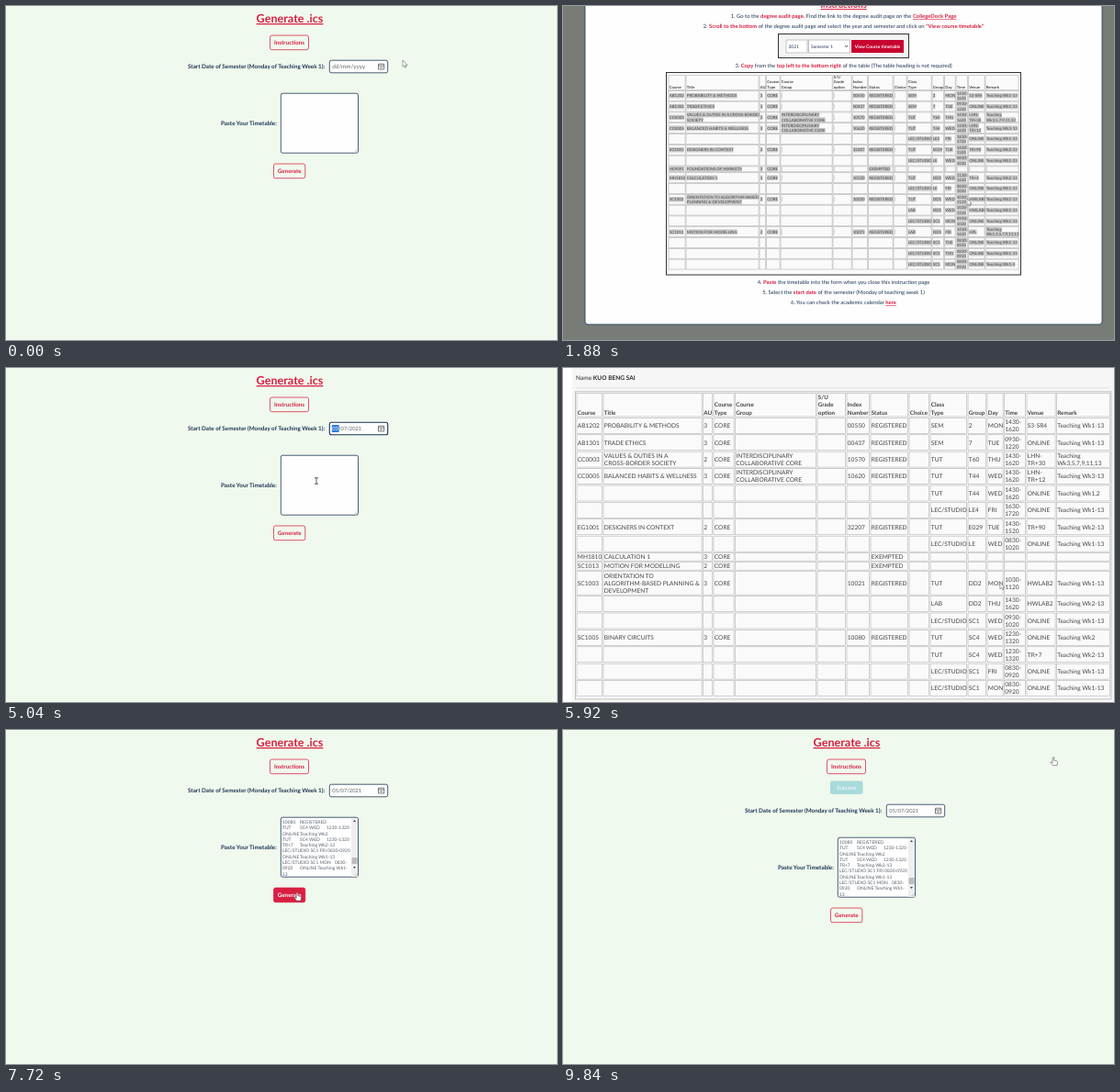
An HTML page for the animation above (9.88 s loop, 600 by 364 pixels).

```html
<!DOCTYPE html>
<html lang="en">
<head>
<meta charset="utf-8">
<title>Timetable to calendar</title>
<style>
html, body { margin: 0; width: 100%; height: 100%; overflow: hidden; background: #f0f9ed; }
svg { display: block; width: 600px; height: 364px; font-family: Lato, "Open Sans", sans-serif; text-rendering: geometricPrecision; fill: #1d3557; }
text { white-space: pre; }
.b { font-weight: 700; }
.m { text-anchor: middle; }
.r { fill: #d81f42; }
.u { text-decoration: underline; }
.btn rect { fill: none; stroke: #d81f42; stroke-width: .75; }
.btn text { fill: #d81f42; }
.btn.hot rect { fill: #d81f42; }
.btn.hot text { fill: #fff; }
.field { fill: #fdfefd; stroke: #1d3557; stroke-width: .8; }
.field.focus { stroke-width: 1.1; }
.cell { fill: #fafafa; stroke: #b2b2b2; stroke-width: .6; }
.hi { fill: #c9c9c9; }
.plain .hi { display: none; }
.table text { fill: #444; }
</style>
</head>
<body>
<svg id="stage" viewBox="0 0 600 364"></svg>
<script>
const LOOP = 9880;
const $ = id => document.getElementById(id);
const pen = document.createElement('canvas').getContext('2d');

const text = (s, x, y, size, cls = '') => `<text x="${x}" y="${y}" font-size="${size}" class="${cls}">${s}</text>`;
const box = (x, y, w, h, attrs = '') => `<rect x="${x}" y="${y}" width="${w}" height="${h}" ${attrs}/>`;
const button = (id, label, x, y, w) =>
  `<g id="${id}" class="btn">${box(x, y, w, 15.7, 'rx="2"')}${text(label, x + w / 2, y + 10.3, 6.25, 'b m')}</g>`;

// --- timetables ---
const HEAD = ['Course', 'Title', 'AU', 'Course~Type', 'Course~Group', 'S/U~Grade~option', 'Index~Number',
  'Status', 'Choice', 'Class~Type', 'Group', 'Day', 'Time', 'Venue', 'Remark'];
const SHARED = 'INTERDISCIPLINARY~COLLABORATIVE CORE';

// code|title|au|index|class|group|day|time|venue|weeks|course group
function cellsOf(row) {
  const [code, title, au, index, kind, group, day, time, venue, weeks, family = ''] = row.split('|');
  const slot = kind
    ? [kind, group, day, time.replace('-', '-~'), venue, 'Teaching' + (weeks.length > 5 ? '~' : ' ') + 'Wk' + weeks]
    : Array(6).fill('');
  return code
    ? [code, title, au, 'CORE', family, '', index, kind ? 'REGISTERED' : 'EXEMPTED', '', ...slot]
    : [...Array(9).fill(null), ...slot];
}

function table(cols, top, rows, o) {
  let y = top;
  const line = (cells, h, head) => {
    const size = head ? o.size * .95 : o.size;
    pen.font = `${head ? 700 : 400} ${size}px Lato, "Open Sans", sans-serif`;
    let out = `<g class="row${head && !o.headSelected ? ' plain' : ''}" data-end="${y + h}">`;
    cells.forEach((cell, i) => {
      const x = cols[i];
      out += box(x, y, cols[i + 1] - x - o.gap, h - o.gap, 'class="cell"');
      if (cell === null) return;
      const parts = cell.split('~'), n = parts.length;
      parts.forEach((s, k) => {
        const mid = head ? y + h - o.lead / 2 - o.gap * 1.4 + (k - n + 1) * o.lead
                         : y + (h - o.gap) / 2 + (k - (n - 1) / 2) * o.lead;
        const w = s ? pen.measureText(s).width : o.gap;
        out += box(x + .8, mid - o.lead / 2, w, o.lead, 'class="hi"');
        if (s) out += text(s, x + .8, mid + size * .35, size, head ? 'b' : '');
      });
    });
    y += h;
    return out + '</g>';
  };
  let out = line(HEAD, o.head, true);
  for (const row of rows) {
    const cells = cellsOf(row);
    const tall = cells[1] && cells[1].split('~').length > 2;
    out += line(cells, cells[7] === 'EXEMPTED' ? o.low : tall ? 27 : o.high);
  }
  return `<g class="table">${out}</g>`;
}

const bigRows = [
  'AB1202|PROBABILITY & METHODS|3|00550|SEM|2|MON|1430-1620|S3-SR4|1-13',
  'AB1301|TRADE ETHICS|3|00437|SEM|7|TUE|0930-1220|ONLINE|1-13',
  'CC0003|VALUES & DUTIES IN A~CROSS-BORDER SOCIETY|2|10570|TUT|T60|THU|1430-1620|LHN-~TR+30|3,5,7,9,11,13|' + SHARED,
  'CC0005|BALANCED HABITS & WELLNESS|3|10620|TUT|T44|WED|1430-1620|LHN-~TR+12|3-13|' + SHARED,
  '||||TUT|T44|WED|1430-1620|ONLINE|1,2',
  '||||LEC/STUDIO|LE4|FRI|1630-1720|ONLINE|1-13',
  'EG1001|DESIGNERS IN CONTEXT|2|32207|TUT|E029|TUE|1430-1520|TR+90|2-13',
  '||||LEC/STUDIO|LE|WED|0830-1020|ONLINE|1-13',
  'MH1810|CALCULATION 1|3|',
  'SC1013|MOTION FOR MODELLING|2|',
  'SC1003|ORIENTATION TO~ALGORITHM-BASED PLANNING &~DEVELOPMENT|3|10021|TUT|DD2|MON|1030-1120|HWLAB2|1-13',
  '||||LAB|DD2|THU|1430-1620|HWLAB2|2-13',
  '||||LEC/STUDIO|SC1|WED|0930-1020|ONLINE|1-13',
  'SC1005|BINARY CIRCUITS|3|10080|TUT|SC4|WED|1230-1320|ONLINE|2',
  '||||TUT|SC4|WED|1230-1320|TR+7|2-13',
  '||||LEC/STUDIO|SC1|FRI|0830-0920|ONLINE|1-13',
  '||||LEC/STUDIO|SC1|MON|0830-0920|ONLINE|1-13'
];
const smallRows = [
  ...bigRows.slice(0, 2),
  'CC0003|VALUES & DUTIES IN A CROSS-BORDER~SOCIETY|2|10570|TUT|T60|THU|1430-1620|LHN-~TR+30|3,5,7,9,11,13|' + SHARED,
  bigRows[3],
  '||||LEC/STUDIO|LE2|FRI|1630-1720|ONLINE|1-13',
  ...bigRows.slice(6, 8),
  'HE9091|FOUNDATIONS OF MARKETS|3|',
  'MH1810|CALCULATION 1|3|10120|TUT|DD1|WED|1130-1220|TR+4|2-13',
  '||||LEC/STUDIO|LE|FRI|0830-1020|ONLINE|1-13',
  'SC1003|ORIENTATION TO ALGORITHM-BASED~PLANNING & DEVELOPMENT|3|10020|TUT|DD1|WED|1030-1120|HWLAB1|1-13',
  '||||LAB|DD1|WED|1030-1220|HWLAB1|1-13',
  '||||LEC/STUDIO|SC1|MON|0930-1020|ONLINE|1-13',
  'SC1013|MOTION FOR MODELLING|2|10073|LAB|DD1|FRI|1430-1620|HPL|1,3,5,7,9,11,13',
  '||||LEC/STUDIO|SC1|TUE|0830-0920|ONLINE|1-13',
  '||||LEC/STUDIO|SC1|THU|0830-0920|ONLINE|1-13',
  '||||LEC/STUDIO|SC1|MON|0830-0920|ONLINE|1-4'
];

// --- scenes ---
const stops = [301, 320, 349, 358];
const pasted = [
  '10080\tREGISTERED', 'TUT\tSC4 WED\t1230-1320', 'ONLINE\tTeaching Wk2', 'TUT\tSC4 WED\t1230-1320',
  'TR+7\tTeaching Wk2-13', 'LEC/STUDIO SC1 FRI 0830-0920', 'ONLINE\tTeaching Wk1-13',
  'LEC/STUDIO SC1 MON\t\t\t0830-', '0920\tONLINE Teaching Wk1-', '13'
].map((s, i) => s.split('\t').map((p, k) => text(p, stops[k], 102 + i * 6.28, 4.95)).join('')).join('');

const page = `<g id="page">
  ${text('Generate .ics', 309, 18, 12.6, 'b m r u')}
  ${button('instr', 'Instructions', 287.5, 32, 42)}
  <g id="ok">${box(291, 55.5, 35.5, 14.5, 'rx="2" fill="#a8dadc"')}
    <g fill="#fff">${text('Success', 308.7, 65, 6.2, 'm')}</g></g>
  <g id="form">
    ${text('Start Date of Semester (Monday of Teaching Week 1):', 198, 68.2, 6.3, 'b')}
    ${box(352.3, 59.2, 63.4, 13.6, 'rx="2" class="field" id="date"')}
    ${box(354.8, 62, 7.8, 8, 'id="mark" fill="#2f7cd6"')}
    <text id="dateText" x="355.3" y="68.2" fill="#666"><tspan id="day"></tspan><tspan id="rest"></tspan></text>
    <path d="M405.5 63.2h6.2v5.8h-6.2zM405.5 65h6.2M407 67h3.2" fill="none" stroke="#444" stroke-width=".7"/>
    ${text('Paste Your Timetable:', 234, 130, 6.35, 'b')}
    ${box(299.3, 95.2, 84.2, 65, 'rx="2" class="field"')}
    <g id="pasted"><g fill="#5b6270">${pasted}</g>
      ${box(376, 96, 7, 63.8, 'fill="#efefef"')}${box(376.5, 139, 6, 7, 'fill="#bdbdbd"')}
      <path d="M378 100l1.5-2 1.5 2zM378 149l1.5 2 1.5-2z" fill="#444"/></g>
    <path d="M379.5 159l3-3M381.3 159l1.2-1.2" stroke="#999" stroke-width=".5"/>
    ${button('gen', 'Generate', 291.5, 172, 34.3)}
  </g></g>`;

const strong = s => `<tspan class="b r">${s}</tspan>`;
const link = s => `<tspan class="b r u">${s}</tspan>`;
const steps = [
  [49, `1. Go to the ${strong('degree audit page.')} Find the link to the degree audit page on the ${link('CollegeDock Page')}`],
  [60.3, `2. ${strong('Scroll to the bottom')} of the degree audit page and select the year and semester and click on ${strong('"View course timetable"')}`],
  [102.5, `3. ${strong('Copy')} from the ${strong('top left to the bottom right')} of the table (The table heading is not required)`],
  [339.3, `4. ${strong('Paste')} the timetable into the form when you close this instruction page`],
  [350.3, `5. Select the ${strong('start date')} of the semester (Monday of teaching week 1)`],
  [361.3, `6. You can check the academic calendar ${link('here')}`]
].map(([y, s]) => text(s, 305.5, y, 5.9, 'm')).join('');

const modal = `<g id="modal">${box(0, 0, 600, 364, 'fill="#000" opacity=".5"')}
  <g id="panel">${box(24, 23, 563, 360, 'rx="3" fill="#fdfefd" stroke="#1d3557" stroke-width=".8"')}
    ${text('Instructions', 305.5, 38, 9.5, 'b m r u')}${steps}
    ${box(234.5, 66.5, 142, 26, 'fill="#f5f5f5" stroke="#333"')}
    ${box(243, 73, 23, 14, 'fill="#fff" stroke="#aaa" stroke-width=".7"')}
    ${box(267.5, 73, 45, 14, 'fill="#fff" stroke="#aaa" stroke-width=".7"')}
    ${box(314, 73, 57, 14, 'fill="#c8022f"')}
    ${text('2021', 245.5, 81.7, 4.9)}${text('Semester 1', 270, 81.7, 4.9)}
    <path d="M307 79l1.5 1.6 1.5-1.6" fill="none" stroke="#222" stroke-width=".8"/>
    <g fill="#fff">${text('View Course timetable', 342.5, 81.7, 4.9, 'b m')}</g>
    ${box(112.5, 108.5, 386, 220.5, 'fill="#fafafa" stroke="#333"')}
    ${table([115, 134, 214, 221.5, 237, 294, 315, 332.5, 360, 375, 402, 415.5, 428, 441.5, 460, 497], 111.7, smallRows,
      { size: 4.4, lead: 5.4, gap: .9, head: 16.6, high: 11.8, low: 6.8 })}
  </g></g>`;

const records = `<g id="records">${box(0, 0, 600, 364, 'fill="#fff"')}<g id="sheet">
  ${box(10, 10, 20, 20, 'fill="#bd2440"')}
  <g fill="#1c2c6b">${['HALVERN', 'POLYTECHNICAL', 'UNIVERSITY'].map((s, i) => text(s, 33, 13 + i * 6.4, 5.7, 'b')).join('')}</g>
  <g letter-spacing=".55">${text('EASTMOORE', 33, 32, 4.9, 'b r')}</g>
  <g fill="#2b2b2b">${text('Scholar Integrated Enrolment Database', 9.5, 71, 13.3, 'b')}
    ${text('Check/Print Courses Registered for 2021-2022 Semester 1', 9.5, 96, 9.9, 'b')}
    ${box(10, 107, 590, 420, 'fill="#f6f6f6"')}${box(14, 135, 582, .8, 'fill="#ddd"')}
    ${text('Name <tspan class="b">KUO BENG SAI</tspan>', 14, 126.8, 6.6)}</g>
  ${box(13.5, 139.5, 583.5, 335, 'fill="#fdfdfd" stroke="#b2b2b2" stroke-width=".8"')}
  ${table([15, 44, 152.5, 164, 187.5, 277, 309, 335, 377, 400, 441, 462, 480.5, 505, 537.5, 597], 141, bigRows,
    { size: 6.6, lead: 8.1, gap: 1.4, head: 27, high: 18.4, low: 10, headSelected: true })}
</g></g>`;

const shapes = {
  a: '<path d="M0 0V7.4L1.7 5.9 2.8 8.3 3.9 7.8 2.9 5.5H5.1Z" fill="#fff" stroke="#666" stroke-width=".6"/>',
  i: '<path d="M-2-3.2H2M0-3.2V3.2M-2 3.2H2" stroke="#333" stroke-width=".8"/>',
  h: '<path d="M-.8 0Q0-.9.8 0V3.1L3.8 3.9Q4.7 4.3 4.5 5.2L3.9 8.6H-.4L-3 5.5Q-2.8 4.5-2 4.9L-.8 5.7Z" fill="#fff" stroke="#555" stroke-width=".6"/>'
};
$('stage').innerHTML = page + modal + records + '<g id="cursor"></g>';

// --- motion: time, x, y, cursor shape ---
const path = [
  [40, 432, 59, 'a'], [200, 385, 165, 'a'], [340, 231, 150, 'a'], [480, 262, 14, 'a'], [640, 311, 40, 'h'],
  [880, 311, 42, 'h'], [920, 311, 46, 'i'], [1120, 420, 200, 'a'], [1800, 440, 210, 'a'], [1880, 440, 210, 'a'],
  [2080, 593, 150, 'a'], [2160, 593, 150, 'a'], [2560, 408, 66, 'h'], [2880, 408, 66, 'h'], [3160, 411, 80, 'a'],
  [3520, 362, 80, 'a'], [3680, 362, 80, 'a'], [3960, 330, 175, 'i'], [4200, 205, 120, 'a'], [4420, 270, 16, 'a'],
  [4640, 245, 70, 'i'], [4800, 372, 122, 'i'], [4960, 372, 122, 'i'], [5040, 338, 123, 'i'], [5160, 338, 123, 'i'],
  [5480, 210, -10, 'a'], [5720, 210, -10, 'a'], [6040, 592, 340, 'i'], [6560, 18, 150, 'i'], [6740, 409, 0, 'i'],
  [6800, 409, 0, 'a'], [7040, 340, 125, 'i'], [7240, 340, 125, 'i'], [7600, 317, 177.5, 'h'], [7920, 317, 177.5, 'h'],
  [8200, 340, 120, 'i'], [8520, 300, 195, 'a'], [8840, 330, 190, 'a'], [8920, 330, 190, 'a'], [9240, 270, 90, 'a'],
  [9480, 380, 2, 'a'], [9760, 534, 30, 'h']
];
const span = (t, a, b) => (1 - Math.cos(Math.PI * Math.min(1, Math.max(0, (t - a) / (b - a))))) / 2;

function cursorAt(t) {
  const n = path.findIndex(k => k[0] > t);
  if (n === 0) return path[0].slice(1);
  if (n < 0) return path[path.length - 1].slice(1);
  const [t0, x0, y0, kind] = path[n - 1], [t1, x1, y1] = path[n], p = span(t, t0, t1);
  return [x0 + (x1 - x0) * p, y0 + (y1 - y0) * p, kind];
}

const show = (id, on) => { $(id).style.display = on ? '' : 'none'; };
const move = (id, x, y) => $(id).setAttribute('transform', `translate(${x} ${y})`);
const rows = [...document.querySelectorAll('#records .row')];

function draw(t) {
  const [x, y, kind] = cursorAt(t);
  const open = t >= 880 && t < 2160, away = t >= 5720 && t < 6800, done = t >= 7920;
  const over = (x0, y0, w) => !open && !away && x >= x0 && x <= x0 + w && y >= y0 && y <= y0 + 15;

  show('modal', open);
  move('page', open ? -4 : 0, 0);
  move('panel', 0, -36 * span(t, 1200, 1760));

  const picked = t >= 3480, marked = t >= 2600 && t < 5160;
  show('mark', marked);
  $('date').classList.toggle('focus', marked);
  $('dateText').setAttribute('font-size', picked ? 5.75 : 6.3);
  $('day').textContent = picked ? '05' : 'dd';
  $('day').setAttribute('fill', marked ? '#fff' : '#666');
  $('rest').textContent = picked ? '/07/2021' : '/mm/yyyy';

  show('pasted', t >= 7200);
  show('ok', done);
  $('ok').setAttribute('opacity', span(t, 7880, 8080));
  const drop = done ? 22 : 0;
  move('form', 0, drop);
  $('instr').classList.toggle('hot', over(287, 32, 43));
  $('gen').classList.toggle('hot', over(291, 172 + drop, 35));

  show('records', away);
  const scroll = 125 * (span(t, 5760, 5960) - span(t, 6160, 6520));
  move('sheet', 0, -scroll);
  const edge = t < 6040 ? 999 : t < 6540 ? y + scroll : 0;
  for (const row of rows) row.classList.toggle('plain', +row.dataset.end < edge);

  if ($('cursor').dataset.kind !== kind) {
    $('cursor').dataset.kind = kind;
    $('cursor').innerHTML = shapes[kind];
  }
  move('cursor', x, y);
}

(function tick() {
  draw(performance.now() % LOOP);
  requestAnimationFrame(tick);
})();
</script>
</body>
</html>
```
